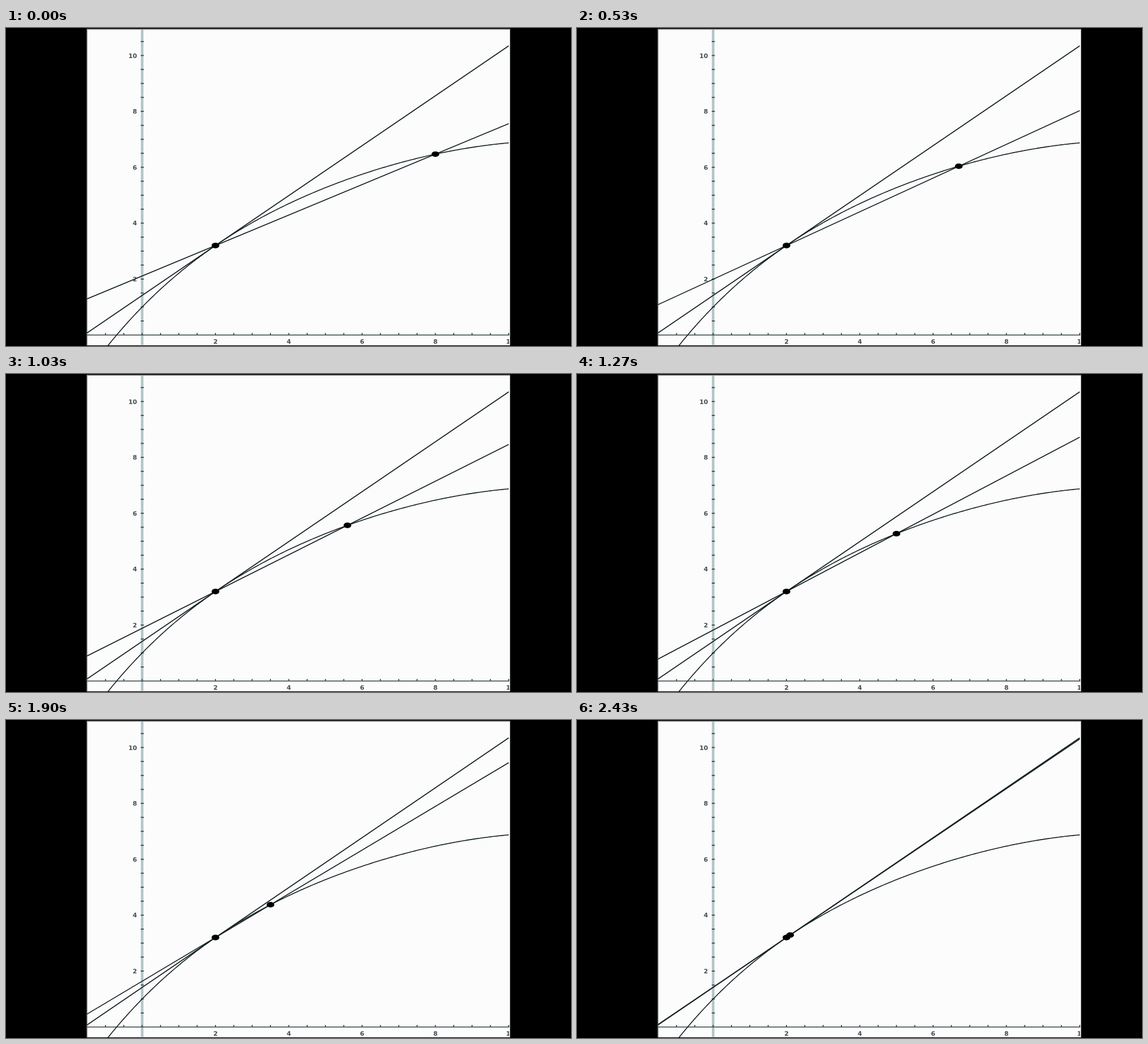
An HTML page with a canvas that plays this animation: 998 by 561 pixels, repeating every 2.46 s.

```html
<!DOCTYPE html>
<html lang="en">
<head>
<meta charset="utf-8">
<title>Secant approaching a tangent</title>
<style>
  html, body { margin: 0; width: 100%; height: 100%; overflow: hidden; background: #000; }
  canvas { display: block; }
</style>
</head>
<body>
<canvas id="stage" width="998" height="561"></canvas>
<script>
const ctx = document.getElementById('stage').getContext('2d');
const LOOP = 2460;
const INK = '#142022';
const LEFT = -1.505, RIGHT = 10;

const px = x => 240.5 + 64.75 * x;
const py = y => 541.5 - 49.3 * y;

// Concave curve as a polynomial in Newton form
const nodes = [-0.93, 0, 2, 5, 8];
const coefs = [-0.375, 1.4785, -0.12918, 0.007956, -0.00042, 0.00001];
const curve = x => nodes.reduceRight((sum, node, i) => coefs[i] + (x - node) * sum, coefs[5]);

const fixed = { x: 2, y: curve(2) };
const TANGENT = 0.893;

// [tick, tenths travelled by the moving point]
const travel = [[0, 0], [16, 13], [25, 19], [38, 30], [49, 38], [64, 51], [73, 59]];

function movingX(time) {
  const tick = Math.min(73, Math.floor(0.3 * Math.floor(time / 10) + 0.15));
  const i = Math.max(1, travel.findIndex(key => key[0] >= tick));
  const [t0, n0] = travel[i - 1], [t1, n1] = travel[i];
  return 8 - Math.round(n0 + (n1 - n0) * (tick - t0) / (t1 - t0)) / 10;
}

function plot(fn, step, width) {
  ctx.beginPath();
  for (let x = LEFT; x < RIGHT; x += step) ctx.lineTo(px(x), py(fn(x)));
  ctx.lineTo(px(RIGHT), py(fn(RIGHT)));
  ctx.strokeStyle = INK;
  ctx.lineWidth = width;
  ctx.stroke();
}

function lineThroughFixed(slope) {
  plot(x => fixed.y + slope * (x - fixed.x), RIGHT - LEFT, 1.7);
}

function dot(x, y) {
  ctx.beginPath();
  ctx.ellipse(px(x), py(y), 6.8, 4.9, 0, 0, Math.PI * 2);
  ctx.fillStyle = '#000';
  ctx.fill();
}

function drawAxes() {
  ctx.fillStyle = '#b3c4c5';
  ctx.fillRect(238.3, 3, 4.4, 556);
  ctx.fillStyle = '#3c4a4c';
  ctx.fillRect(143, 540.8, 746, 1.6);

  for (let y = 0.5; y <= 10.5; y += 0.5) ctx.fillRect(238, py(y) - 0.9, 5.5, 1.8);
  for (let x = -1; x <= 10; x += 0.5) ctx.fillRect(px(x) - 0.9, 538, 1.8, 4);

  ctx.font = 'bold 11px "DejaVu Sans", sans-serif';
  ctx.textBaseline = 'alphabetic';
  ctx.fillStyle = '#414d50';
  ctx.textAlign = 'right';
  for (let y = 2; y <= 10; y += 2) ctx.fillText(y, 231.5, py(y) + 4);
  ctx.textAlign = 'center';
  for (let x = 2; x <= 10; x += 2) ctx.fillText(x, px(x) + (x === 10 ? 3 : 0), 557);
}

function draw(time) {
  ctx.fillStyle = '#000';
  ctx.fillRect(0, 0, 998, 561);
  ctx.fillStyle = '#9a9c9e';
  ctx.fillRect(142.5, 1.5, 748, 558.5);
  ctx.fillStyle = '#fcfcfd';
  ctx.fillRect(144, 3, 746, 556.5);

  ctx.save();
  ctx.beginPath();
  ctx.rect(143, 2, 746, 558);
  ctx.clip();
  drawAxes();
  const x = movingX(time), y = curve(x);
  plot(curve, 0.05, 1.6);
  lineThroughFixed(TANGENT);
  lineThroughFixed((y - fixed.y) / (x - fixed.x));
  dot(fixed.x, fixed.y);
  dot(x, y);
  ctx.restore();
}

const start = performance.now();
function frame() {
  draw((performance.now() - start) % LOOP);
  requestAnimationFrame(frame);
}
frame();
</script>
</body>
</html>
```
